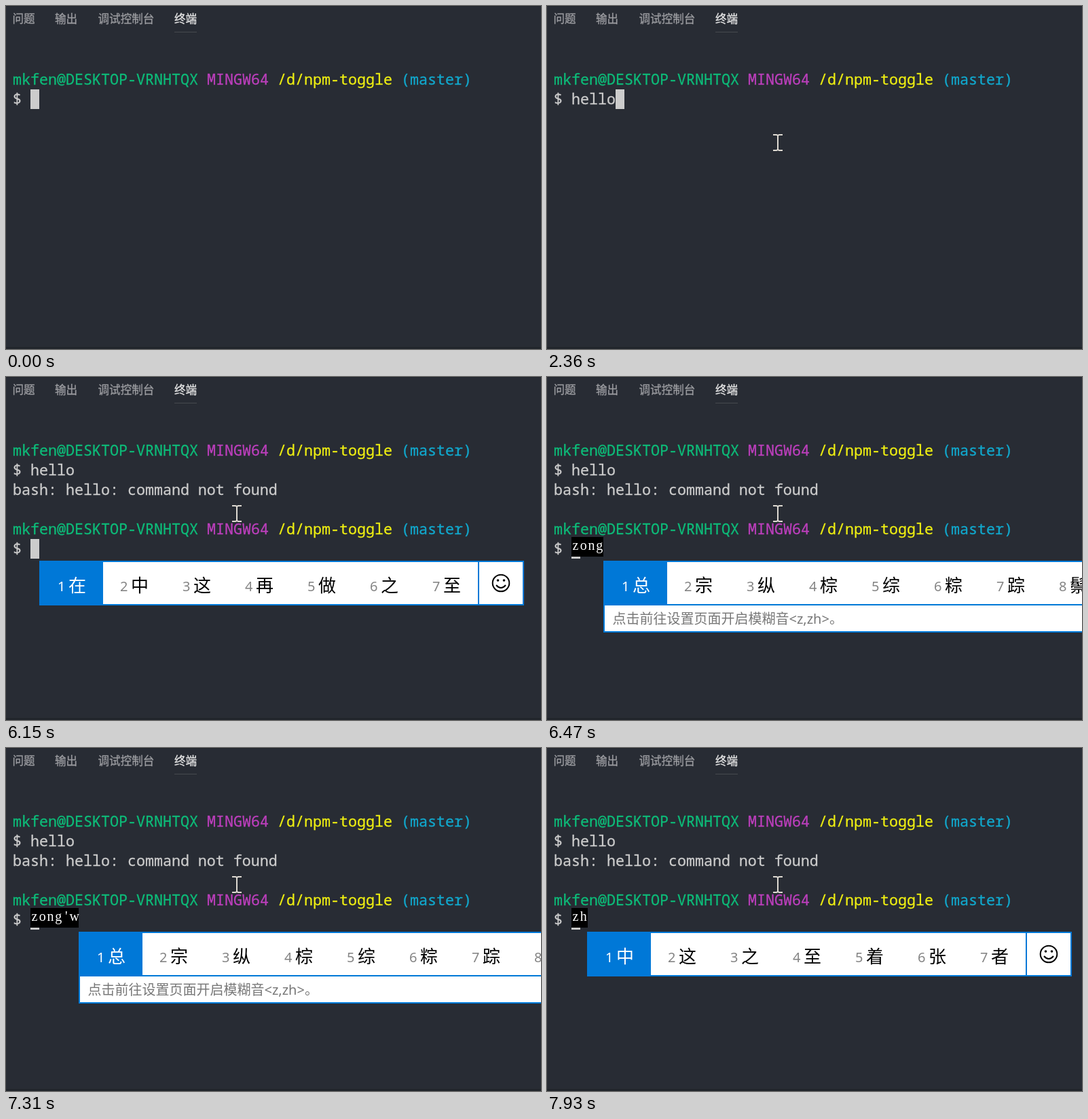
Write an HTML page that moves like this. It is 788 by 506 pixels and loops after 8000 ms.

```html
<!DOCTYPE html>
<html lang="zh-CN">
<head>
<meta charset="utf-8">
<title>Terminal</title>
<style>
  html, body { margin: 0; width: 100%; height: 100%; overflow: hidden; background: #282c34; }
  svg { display: block; }
  text { white-space: pre; }
  .tabs { font: 16.6px "Noto Sans CJK SC", "Noto Sans CJK", sans-serif; color: #9b9ca0; }
  .tabs .active { color: #e7e7e7; }
  .term { font: 21.667px "Noto Sans Mono", monospace; color: #ccc; }
  .tabs text, .term text { fill: currentColor; stroke: currentColor; stroke-width: .3; }
  .user { color: #0dbc79; }
  .sys { color: #bc3fbc; }
  .path { color: #eeee12; }
  .branch { color: #11a8cd; }
  .comp { font: 20px "Liberation Serif", serif; fill: #fff; text-anchor: middle; }
  .popup { font-family: "Noto Sans", "Noto Sans CJK SC", "Noto Sans CJK", sans-serif; }
  .num { font-size: 20px; fill: #858585; }
  .word { font-size: 26px; fill: #000; }
  .picked .num, .picked .word { fill: #fff; }
  .hint { font-size: 20px; fill: #777; }
</style>
</head>
<body>
<svg id="stage" width="788" height="506" viewBox="0 0 788 506">
  <rect width="788" height="506" fill="#282c34"/>
  <rect width="788" height="1" fill="#21252b"/>
  <rect y="503" width="788" height="3" fill="#21252b"/>
  <g class="tabs">
    <text x="9.5" y="25">问题</text>
    <text x="72" y="25">输出</text>
    <text x="135.5" y="25">调试控制台</text>
    <text x="248" y="25" class="active">终端</text>
    <rect x="248" y="38" width="33" height="1" fill="#474a4f"/>
  </g>
  <g id="term" class="term"></g>
  <g id="ime"></g>
  <path id="pointer" d="M-7-11h5l2 1 2-1h5M0-10v21M-7 12h5l2-1 2 1h5" fill="none" stroke="#dedad2" stroke-width="2"/>
</svg>
<script>
const LOOP = 8000, CELL = 13, ROW = 29, LEFT = 10, TOP = 94;
const BLUE = '#0078d7';
const $ = id => document.getElementById(id);

function add(parent, tag, attrs, text) {
  const el = document.createElementNS('http://www.w3.org/2000/svg', tag);
  for (const key in attrs) el.setAttribute(key, attrs[key]);
  if (text !== undefined) el.textContent = text;
  return parent.appendChild(el);
}
const box = (parent, x, y, width, height, fill) => add(parent, 'rect', {x, y, width, height, fill});
const show = (el, on) => el.setAttribute('visibility', on ? 'inherit' : 'hidden');
const colX = col => LEFT + col * CELL;
const rowY = row => TOP + row * ROW;

function print(parent, col, row, text, cls = '') {
  return add(parent, 'text', {x: colX(col), y: rowY(row) + 22, class: cls}, text);
}
function prompt(parent, row) {
  print(parent, 0, row, 'mkfen@DESKTOP-VRNHTQX', 'user');
  print(parent, 22, row, 'MINGW64', 'sys');
  print(parent, 30, row, '/d/npm-toggle', 'path');
  print(parent, 44, row, '(master)', 'branch');
  print(parent, 0, row + 1, '$');
}

// Terminal
const term = $('term');
prompt(term, 0);
const typed = print(term, 2, 1, '');
const output = add(term, 'g', {});
print(output, 0, 2, 'bash: hello: command not found');
prompt(output, 4);
const caret = box(term, 0, 0, CELL, ROW, '#ccc');

// time, column, row of the block caret
const carets = [
  [0, 2, 1], [1740, 3, 1], [1890, 4, 1], [2120, 5, 1], [2200, 6, 1],
  [2360, 7, 1], [2600, 8, 1], [3060, 0, 2], [3120, 2, 5]
];

// Input method
const lists = {
  z: '在 中 这 再 做 之 至',
  zh: '中 这 之 至 着 张 者',
  zo: '走 做 总 组 作 座 坐',
  zong: '总 宗 纵 棕 综 粽 踪 鬃',
  we: '总为 总位 宗卫 纵位 总未 总围',
  wen: '纵纹 总问 宗文 中(zhōng)文 总 宗'
};
// time, composed letters, candidate list
const inputs = [
  [6150, '', 'z'], [6240, 'z', 'z'], [6310, 'zo', 'zo'], [6390, 'zon', 'zong'],
  [6460, 'zong', 'zong'], [6540, "zong'w", 'zong'], [6610, "zong'we", 'we'],
  [6690, "zong'wen", 'wen'], [7150, "zong'we", 'we'], [7230, "zong'w", 'we'],
  [7310, "zong'w", 'zong'], [7380, 'zong', 'zong'], [7460, 'zon', 'zong'],
  [7540, 'zo', 'zo'], [7620, 'z', 'zo'], [7700, 'z', 'z'], [7930, 'zh', 'zh']
];

const wordWidth = word => [...word].reduce((w, c) => w + (c > '\u2fff' ? 26 : 13.6), 0);

function drawPopup(g, left, key) {
  const words = lists[key].split(' ');
  const hinted = key.length > 2 || key === 'we';
  const popup = add(g, 'g', {class: 'popup'});
  const cells = words.map(w => Math.round(66 + wordWidth(w)));
  const end = left + 2 + cells.reduce((a, b) => a + b);
  box(popup, left, 271, end + 68 - left, hinted ? 106 : 66, BLUE);
  box(popup, left + 2, 273, end - left - 2, 62, '#fff');
  box(popup, end + 2, 273, 64, 62, '#fff');
  if (hinted) {
    box(popup, left + 2, 337, end + 64 - left, 38, '#fff');
    add(popup, 'text', {x: left + 13.5, y: 364, class: 'hint'}, '点击前往设置页面开启模糊音<z,zh>。');
  }
  let x = left + 2;
  words.forEach((word, i) => {
    const cell = add(popup, 'g', {class: i ? '' : 'picked'});
    if (!i) box(cell, left, 271, cells[0] + 2, 66, BLUE);
    add(cell, 'text', {x: x + 25, y: 316, class: 'num'}, i + 1);
    add(cell, 'text', {x: x + 41, y: 317, class: 'word'}, word);
    x += cells[i];
  });
  const face = add(popup, 'g', {transform: `translate(${end + 34} 304)`, fill: 'none', stroke: '#000', 'stroke-width': 2});
  add(face, 'circle', {r: 12.3});
  add(face, 'path', {d: 'M-7 3Q0 11 7 3'});
  for (const cx of [-4.5, 4.5]) add(face, 'circle', {cx, cy: -4, r: 1.8, fill: '#000', stroke: 'none'});
}

function drawInput([, letters, key]) {
  const g = add($('ime'), 'g', {visibility: 'hidden'});
  const n = letters.length, pitch = 11.75;
  if (n) {
    box(g, 36, 236, Math.round(n * pitch), 29, '#000');
    const xs = [...letters].map((_, i) => 36 + (i + 0.5) * pitch).join(' ');
    add(g, 'text', {x: xs, y: 254.5, class: 'comp'}, letters);
  }
  drawPopup(g, n ? Math.max(48, 35 + 12 * n) : 49, key);
  return g;
}
const panels = inputs.map(drawInput);

// Mouse pointer: glides in along an arc, sampled every 80 ms
const ease = p => p * p * (3 - 2 * p);
function pointerAt(t) {
  if (t >= 730) return [340, 201];
  const p = Math.max(0, Math.min(6, Math.floor((t - 100) / 80))) / 6;
  return [
    Math.round(651 - 315 * ease(p ** 1.15)),
    Math.round(500 - 303 * ease(p ** 0.65))
  ];
}

const current = (steps, t) => steps.filter(s => s[0] <= t).length - 1;

function draw(t) {
  const [, col, row] = carets[current(carets, t)];
  caret.setAttribute('x', colX(col));
  caret.setAttribute('y', rowY(row));
  typed.textContent = row > 1 ? 'hello' : 'hello'.slice(0, col - 2);
  show(output, t >= 3120);
  const active = current(inputs, t);
  panels.forEach((g, i) => show(g, i === active));
  show($('pointer'), t >= 100);
  $('pointer').setAttribute('transform', `translate(${pointerAt(t)})`);
}

const start = performance.now();
function tick() {
  draw(Math.max(0, performance.now() - start) % LOOP);
  requestAnimationFrame(tick);
}
tick();
</script>
</body>
</html>
```
